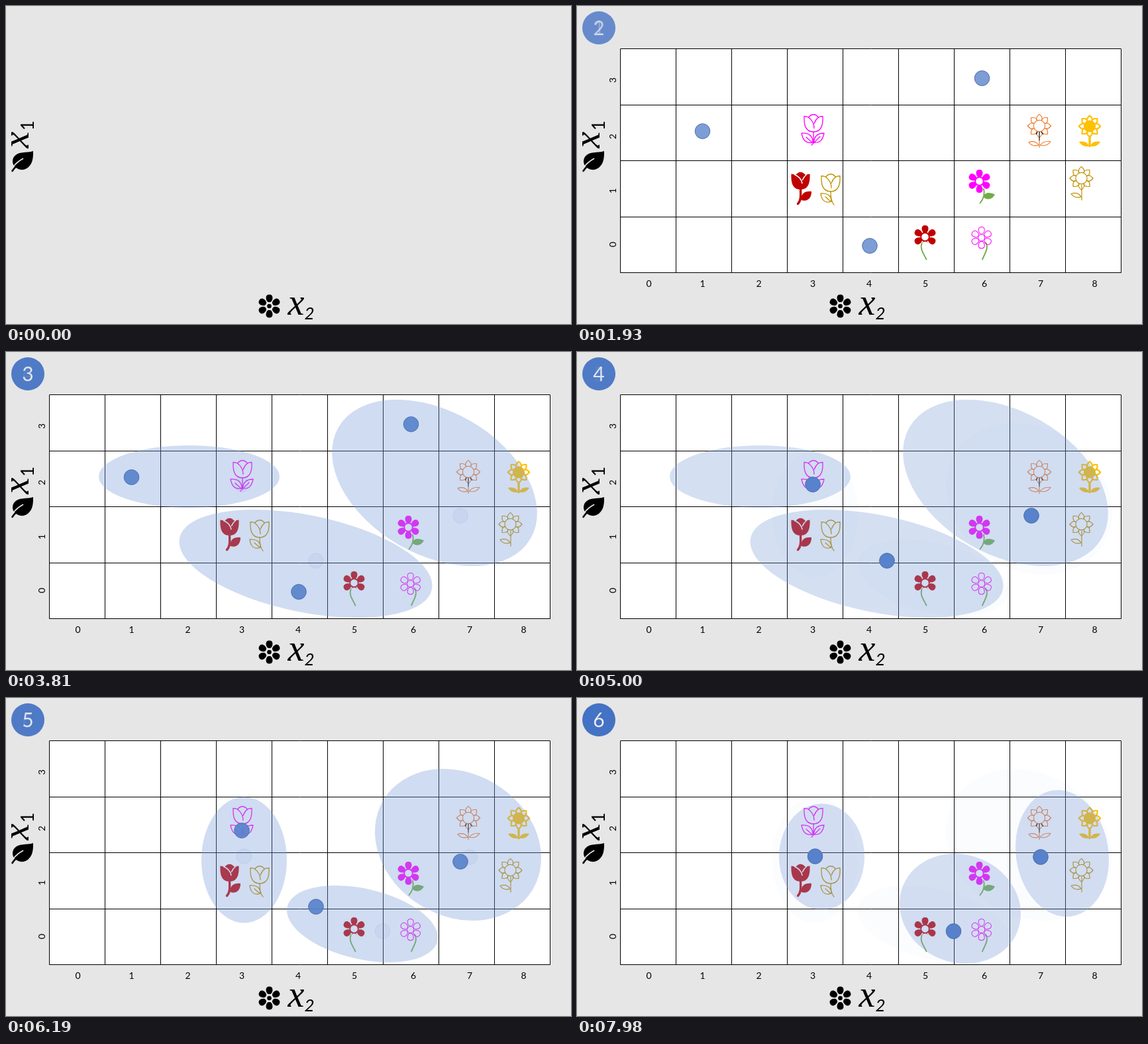
These frames come from a looping animation (853x480 px, 8000 ms). An HTML page with a canvas:

```html
<!DOCTYPE html>
<html lang="en">
<head>
<meta charset="utf-8">
<title>Clustering flowers</title>
<style>
html, body { margin: 0; width: 100%; height: 100%; overflow: hidden; background: #e6e6e6; }
canvas { display: block; }
</style>
</head>
<body>
<canvas id="stage" width="853" height="480"></canvas>
<script>
const W = 853, H = 480, LOOP = 8000, STEP = 60;
const stage = document.getElementById('stage').getContext('2d');
const BLUE = '#4472c4', RED = '#c00000', PINK = '#ff00ff', GOLD = '#bf9000';
const ORANGE = '#ed7d31', YELLOW = '#ffc000', GREEN = '#70ad47';

// Start and number of steps of each dissolve
const fades = [[60, 12], [1450, 13], [2630, 13], [3810, 12], [5000, 12], [6190, 12], [7380, 12]];

const dots = [
  [[189.5, 189], [611.5, 109], [442, 362]],
  [[356, 200], [468, 315], [686, 247]],
  [[359.5, 239], [568.5, 352], [700, 240]]
];

// x, y, rx, ry, degrees
const clusters = [
  [[276.5, 188, 136.5, 47, 0], [452.5, 319.5, 194.3, 73.2, 11.5], [647, 197.5, 167.6, 108, 30]],
  [[359.5, 244.5, 64.5, 95, 0], [538, 341, 116.3, 53.2, 12.9], [682.5, 221.5, 131.4, 107.7, 31]],
  [[369.5, 239.5, 64.5, 80, 0], [578.5, 318, 93, 81.3, 21.7], [732.5, 234.5, 96, 69.8, 81.4]]
];

function layer(draw) {
  const c = document.createElement('canvas');
  c.width = W;
  c.height = H;
  const g = c.getContext('2d');
  g.lineCap = g.lineJoin = 'round';
  draw(g);
  return c;
}

function at(g, x, y, deg, draw) {
  g.save();
  g.translate(x, y);
  g.rotate(deg * Math.PI / 180);
  draw();
  g.restore();
}

function line(g, d, color, width = 1.3) {
  g.strokeStyle = color;
  g.lineWidth = width;
  g.stroke(new Path2D(d));
}

function fill(g, d, color) {
  g.fillStyle = color;
  g.fill(new Path2D(d));
}

function disc(g, x, y, r, color) {
  g.fillStyle = color;
  g.beginPath();
  g.arc(x, y, r, 0, 7);
  g.fill();
}

function ring(g, x, y, r, color, width = 1.2) {
  g.strokeStyle = color;
  g.lineWidth = width;
  g.beginPath();
  g.arc(x, y, r, 0, 7);
  g.stroke();
}

function label(g, s, x, y, font, color = '#000') {
  g.font = font;
  g.fillStyle = color;
  g.textAlign = 'center';
  g.textBaseline = 'alphabetic';
  g.fillText(s, x, y);
}

const PETAL = 'M0 -17.5C6 -17.5 6 -11 3 -7C1.8 -5.6 -1.8 -5.6 -3 -7C-6 -11 -6 -17.5 0 -17.5Z';
const RAY = 'M-3.5 -8.5Q-6.5 -12 0 -17.6Q6.5 -12 3.5 -8.5';
const CUP = 'M-14 -10C-14.5 1 -13 13.5 0 13.5C13 13.5 14.5 1 14 -10Q10 -10 7.5 -8.5Q0 -17 -7.5 -8.5Q-10 -10 -14 -10Z';

function daisy(g, x, y, color, solid) {
  for (let i = 0; i < 6; i++) at(g, x, y, i * 60, () => {
    if (solid) fill(g, PETAL, color);
    else {
      g.scale(0.92, 0.92);
      line(g, PETAL, color, 1.1);
    }
  });
  if (solid) ring(g, x, y, 6.3, color, 2);
  else ring(g, x, y, 5, color, 1);
}

function sunflower(g, x, y, color, width, size = 1) {
  for (let i = 0; i < 8; i++) at(g, x, y, i * 45, () => {
    g.scale(size, size);
    line(g, RAY, color, width);
  });
  ring(g, x, y, 8.6 * size, color, width);
}

function tulip(g, x, y, color, solid) {
  at(g, x, y, 0, () => {
    if (solid) {
      fill(g, CUP, color);
      line(g, 'M-9 -9C-4 -7 1 -3 2.5 4M9 -9Q5 -6 3 -1', '#fff', 1.5);
    } else {
      line(g, CUP, color);
      line(g, 'M-7.5 -8.5C-3 -5 1 0 1 8M7.5 -8.5Q3 -5 1 1', color);
    }
  });
}

const grid = layer(g => {
  g.fillStyle = '#fff';
  g.fillRect(65, 64, 757, 339);
  for (let i = 0; i < 10; i++) line(g, `M${65.5 + 84 * i} 65V402.5`, '#000', 1);
  for (let i = 0; i < 5; i++) line(g, `M66 ${Math.ceil(64 + 84.5 * i) + 0.5}H821`, '#000', 1);

  const font = '14px Lato, Carlito, sans-serif';
  [108.5, 189.5, 274.5, 356, 441, 526, 615, 700, 781.5].forEach((x, i) => label(g, i, x, 424, font));
  [360, 279, 197, 112].forEach((y, i) => at(g, 59, y, -90, () => label(g, i, 0, 0, font)));

  // Tulips
  tulip(g, 357, 176.5, PINK);
  line(g, 'M357 190V207L354 210M356 206C345 208 341 202 339 192C350 191 356 196 356 206M357.5 206C358 196 363 192 373 192C371 202 367 207 357.5 206M346 198L355 206M367 197L358 206', PINK);
  tulip(g, 337.5, 263.5, RED, true);
  line(g, 'M337.5 276C338 288 338 294 333.5 298.5', RED, 3.4);
  fill(g, 'M338.5 293C338 283 344 279 354 280C354 290 348 296 338.5 293Z', RED);
  tulip(g, 383, 266.5, GOLD);
  line(g, 'M383 280C383 290 384 296 388 300M384 295C374 299 369 292 368 283C378 282 384 286 384 295M375 288L383 295', GOLD);

  // Sunflowers
  sunflower(g, 698, 181, ORANGE, 1.2);
  line(g, 'M698 190V203M695 190L693.5 193.5M701 190L703.5 193.5', '#111', 1.2);
  line(g, 'M698 203V213.5M697 210C690 212 685 210 682 205.5C689 203.5 694 205 697 210M699.5 210C703 205 708 203.5 715 204.5C711 210 706 212 699.5 210', ORANGE, 1.2);
  sunflower(g, 774, 181.5, YELLOW, 2.4, 0.92);
  disc(g, 774, 181.5, 8, YELLOW);
  line(g, 'M774 198V211.5', YELLOW, 3.4);
  fill(g, 'M773 211.5C766 213 761 210 758 205C766 203.5 771 206 773 211.5ZM775 211.5C782 213 787 210 790 205C782 203.5 777 206 775 211.5Z', YELLOW);
  sunflower(g, 761.5, 260, GOLD, 1.2);
  line(g, 'M762 270V293M761 288C754 290 749 288 746 283.5C753 281 758 283 761 288', GOLD, 1.2);
  line(g, 'M764 288C766 283 771 281.5 777.5 283C774 289 769 290 764 288', YELLOW, 1);

  // Daisies
  line(g, 'M614 276Q617 287 608.5 297.5', GREEN, 1.9);
  fill(g, 'M613 288C616 281 623 280.5 631 284.5C627 292 619 294 613 288Z', GREEN);
  daisy(g, 607.5, 264.5, PINK, true);
  daisy(g, 525.5, 348.5, RED, true);
  line(g, 'M617 357C622 365 616 373 612 382.5', GREEN, 1.9);
  daisy(g, 610.7, 349.7, PINK);
});

const axes = layer(g => {
  g.fillStyle = '#e6e6e6';
  g.fillRect(0, 0, W, H);
  const big = 'italic 56px "Liberation Serif", "Noto Serif", serif';
  const sub = 'italic 26px Lato, Carlito, sans-serif';
  label(g, 'x', 438, 465.5, big);
  label(g, '2', 458, 473, sub);
  at(g, 34, 202, -90, () => label(g, 'x', 0, 0, big));
  at(g, 42, 180.5, -90, () => label(g, '1', 0, 0, '26px Lato, Carlito, sans-serif'));

  at(g, 397.5, 453, 0, () => {
    for (let i = 0; i < 6; i++) at(g, 0, 0, i * 60, () => fill(g, PETAL, '#000'));
    disc(g, 0, 0, 5, '#e6e6e6');
    disc(g, 0, 0, 3.3, '#000');
  });

  fill(g, 'M41 219C31 222 19 219 12.5 227C9 232 9.5 237 12 241C17 248 27 249 33 244C41 237 41 228 41 219Z', '#000');
  line(g, 'M25.5 230.5Q17 235 11 242.5', '#e6e6e6', 1.8);
  line(g, 'M16 241.5Q12 245 9.5 249', '#000', 2.6);
});

// White patches dissolve in with the flowers and hide one leaf and one petal
const patches = layer(g => {
  g.fillStyle = '#fff';
  g.fillRect(763, 280, 17, 12);
  disc(g, 525.5, 361.3, 5.8, '#fff');
  line(g, 'M520.5 358C517.5 367 523 373 527.5 382.5', GREEN, 1.9);
});

function drawDots(g, set) {
  for (const [x, y] of set) {
    disc(g, x, y, 11.5, BLUE);
    ring(g, x, y, 11.3, '#2f528f', 0.9);
  }
}

function drawClusters(g, set) {
  g.fillStyle = 'rgba(126,159,216,.36)';
  for (const [x, y, rx, ry, deg] of set) {
    g.beginPath();
    g.ellipse(x, y, rx, ry, deg * Math.PI / 180, 0, 7);
    g.fill();
  }
}

function render(t) {
  const p = fades.map(([start, n]) =>
    Math.max(0, Math.min(1, (Math.floor((t - start) / STEP) + 1) / n)));
  // Opacity of something that enters with fade a and leaves with fade b
  const span = (a, b) => p[a] * (1 - (p[b] || 0));
  const show = (alpha, draw) => {
    if (alpha <= 0) return;
    stage.globalAlpha = alpha;
    draw();
  };

  stage.globalAlpha = 1;
  stage.drawImage(axes, 0, 0);
  show(p[0], () => stage.drawImage(grid, 0, 0));
  show(p[0], () => stage.drawImage(patches, 0, 0));

  [[1, 3], [3, 5], [5]].forEach(([a, b], i) =>
    show(span(a, b), () => drawDots(stage, dots[i])));
  [[2, 4], [4, 6], [6]].forEach(([a, b], i) =>
    show(span(a, b), () => drawClusters(stage, clusters[i])));

  const badges = [0, 1, 2, 3, 4, 5].map(i => span(i, i < 5 ? i + 1 : -1));
  badges.forEach(alpha => show(alpha, () => disc(stage, 33, 33, 25, BLUE)));
  badges.forEach((alpha, i) => show(alpha, () =>
    label(stage, i + 1, 33, 43.5, '30px Lato, Carlito, sans-serif', '#eee')));
}

let begin;
function tick(now) {
  if (begin === undefined) begin = now;
  render((now - begin) % LOOP);
  requestAnimationFrame(tick);
}
render(0);
requestAnimationFrame(tick);
</script>
</body>
</html>
```
